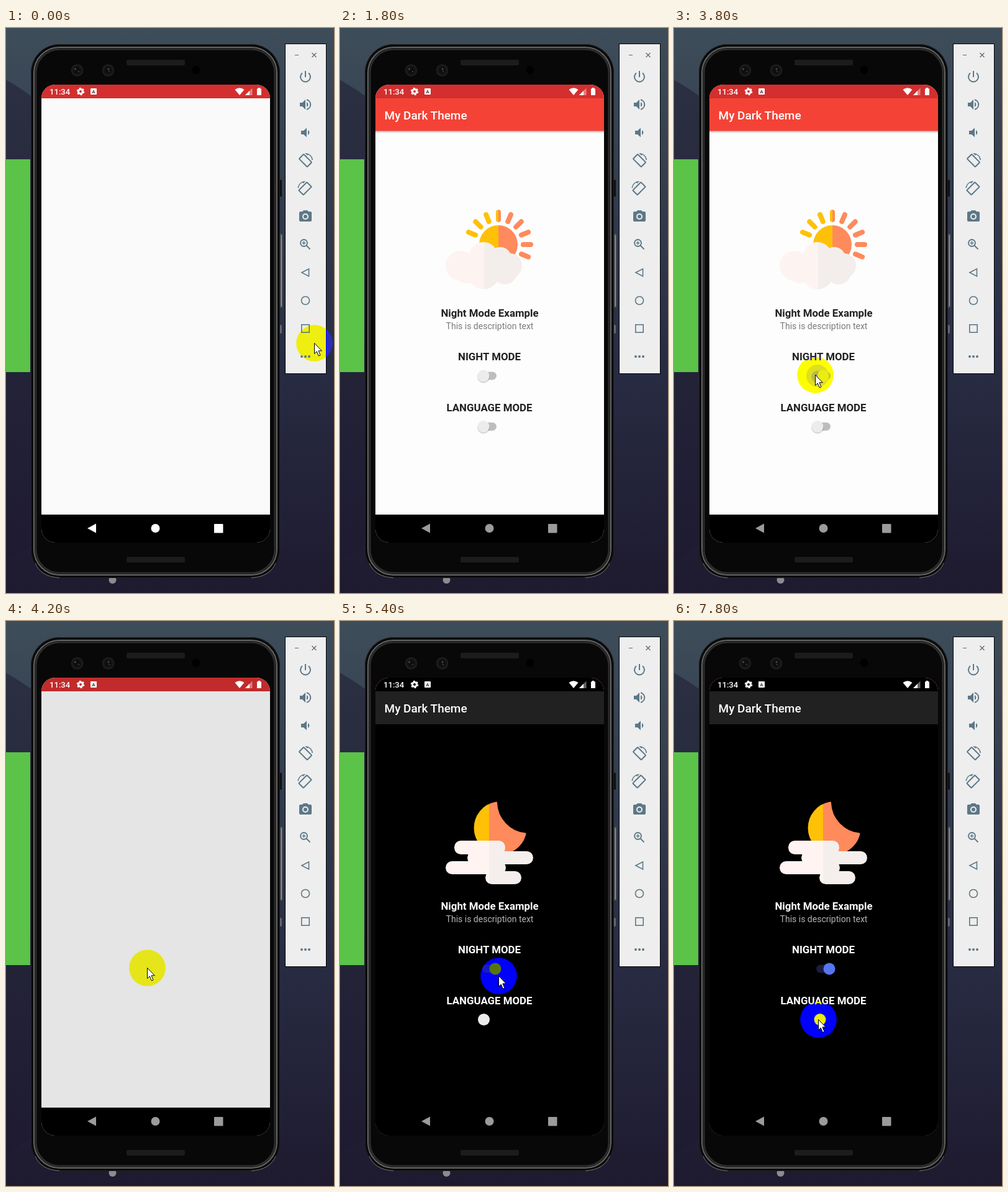
Write an HTML page that moves like this. It is 528 px wide and 908 px high and loops after 8000 ms.

```html
<!DOCTYPE html>
<html lang="en">
<head>
<meta charset="utf-8">
<title>Night mode demo</title>
<style>
  html, body { margin: 0; width: 100%; height: 100%; overflow: hidden; background: #2b3248; }
  svg { display: block; width: 528px; height: 908px; }
  text { font-family: Roboto, "Open Sans", sans-serif; }

  /* One loop is 8 s; a 200 ms step is 2.5%. */
  .app, .day, .night, .dim, .ink, .soft, .pointer, .press, .toggle, .nudge {
    animation: 8s step-end infinite;
  }
  .app { animation-name: app; }
  .day { animation-name: day; }
  .night { animation-name: night; }
  .dim { animation-name: dim; }
  .ink { animation-name: ink; }
  .soft { animation-name: soft; }
  .pointer { animation-name: pointer; }
  .press { animation-name: press; }
  .toggle { animation-name: toggle; }
  .nudge { animation-name: nudge; }
  .nav { animation: nav 8s linear infinite; }
  .halo { fill: #00f; mix-blend-mode: difference; }

  @keyframes app {
    0% { visibility: hidden; } 22.5% { visibility: visible; }
    52.5% { visibility: hidden; } 67.5%, 100% { visibility: visible; }
  }
  @keyframes day {
    0% { visibility: hidden; } 22.5% { visibility: visible; } 52.5%, 100% { visibility: hidden; }
  }
  @keyframes night { 0% { visibility: hidden; } 67.5%, 100% { visibility: visible; } }
  @keyframes dim { 0% { opacity: 0; } 52.5% { opacity: .085; } 55%, 100% { opacity: 0; } }
  @keyframes ink { 0% { fill: #212121; } 67.5%, 100% { fill: #fff; } }
  @keyframes soft { 0% { fill: #7b7b7b; } 67.5%, 100% { fill: #b4b4b4; } }
  @keyframes press { 0% { opacity: 0; } 42.5% { opacity: .12; } 50%, 100% { opacity: 0; } }
  @keyframes toggle {
    0% { transform: none; fill: #ececec; }
    47.5% { transform: translateX(9px); }
    50%, 100% { transform: translateX(19px); fill: #536dfe; }
  }
  @keyframes nudge { 0% { transform: none; } 97.5%, 100% { transform: translateX(3.5px); } }
  @keyframes nav {
    0% { fill: #fff; animation-timing-function: steps(7, end); }
    17.5%, 100% { fill: #9b9b9b; }
  }
  @keyframes pointer {
    0% { transform: translate(496px, 506px); }
    2.5% { transform: translate(506px, 506px); }
    5% { transform: translate(522px, 505px); }
    7.5% { transform: translate(570px, 505px); }
    27.5% { transform: translate(417px, 613px); }
    30% { transform: translate(390px, 606px); }
    32.5% { transform: translate(330px, 585px); }
    35% { transform: translate(268px, 566px); }
    37.5% { transform: translate(223px, 558px); }
    40% { transform: translate(227px, 557px); }
    55% { transform: translate(241px, 558px); }
    57.5% { transform: translate(252px, 570px); }
    60% { transform: translate(258px, 576px); }
    62.5% { transform: translate(255px, 570px); }
    70% { transform: translate(258px, 580px); }
    72.5% { transform: translate(266px, 596px); }
    75% { transform: translate(274px, 607px); }
    77.5% { transform: translate(278px, 612px); }
    80% { transform: translate(243px, 630px); }
    82.5% { transform: translate(241px, 598px); }
    85% { transform: translate(240px, 557px); }
    87.5% { transform: translate(240px, 562px); }
    90% { transform: translate(236px, 600px); }
    92.5% { transform: translate(232px, 630px); }
    95% { transform: translate(233px, 639px); }
    97.5%, 100% { transform: translate(232px, 640px); }
  }
</style>
</head>
<body>
<svg viewBox="0 0 528 908">
  <defs>
    <linearGradient id="sky" x2="0" y2="1">
      <stop stop-color="#3e4d5a"/><stop offset=".25" stop-color="#343f50"/>
      <stop offset=".6" stop-color="#282c43"/><stop offset="1" stop-color="#1e1a2f"/>
    </linearGradient>
    <linearGradient id="disc" x2="0" y2="1">
      <stop stop-color="#2c3143"/><stop offset="1" stop-color="#1d1930"/>
    </linearGradient>
    <linearGradient id="sun" gradientUnits="userSpaceOnUse" x1="254.5" x2="255.5">
      <stop stop-color="#fec107"/><stop offset="1" stop-color="#ff8a5c"/>
    </linearGradient>
    <linearGradient id="moon" gradientUnits="userSpaceOnUse" x1="239.5" x2="240.5">
      <stop stop-color="#fec107"/><stop offset="1" stop-color="#ff8a5c"/>
    </linearGradient>
    <linearGradient id="cloud" gradientUnits="userSpaceOnUse" x1="231.5" x2="232.5">
      <stop stop-color="#fdf3f1"/><stop offset="1" stop-color="#f3eeeb"/>
    </linearGradient>
    <linearGradient id="mist" gradientUnits="userSpaceOnUse" x1="239.5" x2="240.5">
      <stop stop-color="#fff4f2"/><stop offset="1" stop-color="#f4efec"/>
    </linearGradient>
    <linearGradient id="shade" x2="0" y2="1">
      <stop stop-opacity=".24"/><stop offset="1" stop-opacity="0"/>
    </linearGradient>
    <clipPath id="glass"><rect x="57" y="91" width="368" height="736" rx="22"/></clipPath>
  </defs>

  <!-- Desktop -->
  <rect width="528" height="908" fill="url(#sky)"/>
  <circle cx="-220" cy="470" r="445" fill="url(#disc)"/>
  <rect x="-303" y="211" width="342" height="342" fill="#5bc348"/>

  <!-- Phone body -->
  <circle cx="171.500" cy="887" r="6" fill="#8b8b90"/>
  <g fill="#101012">
    <rect x="440" y="244" width="4" height="27"/>
    <rect x="440" y="331" width="5" height="118" fill="#55565c"/>
    <rect x="443" y="333" width="1" height="114" fill="#a0a0a4"/>
    <rect x="440" y="477" width="4" height="14" rx="2" fill="#66676c"/>
  </g>
  <rect x="40" y="26" width="401" height="858" rx="46" fill="#080808"/>
  <g fill="none">
    <rect x="40.500" y="26.500" width="400" height="857" rx="45.500" stroke="#222"/>
    <rect x="45" y="31" width="391" height="848" rx="41" stroke="#666" stroke-width="2"/>
    <rect x="48" y="34" width="385" height="842" rx="38" stroke="#2c2c2c" stroke-width="3"/>
    <path d="M47 860Q56 882 86 883.500M434 860Q425 882 395 883.500" stroke="#8c8c8c" stroke-width=".8"/>
  </g>
  <g fill="#1c1c1e">
    <rect x="194" y="51" width="94" height="9" rx="2"/>
    <rect x="194" y="850" width="94" height="9" rx="2"/>
    <g fill="#161617" stroke="#212123" stroke-width="1.500">
      <circle cx="114.500" cy="68" r="9"/><circle cx="164.500" cy="68" r="9"/>
    </g>
    <g fill="#0e0e0f">
      <circle cx="114.500" cy="68" r="5.500"/><circle cx="164.500" cy="68" r="5.500"/>
    </g>
    <g fill="#4a4a4f">
      <circle cx="111.500" cy="66" r="1.500"/><circle cx="117" cy="70" r="1"/>
      <circle cx="165" cy="66" r="1.500"/><circle cx="166" cy="70" r="1"/>
    </g>
    <circle cx="306" cy="67.500" r="6.500" fill="#000"/>
  </g>

  <!-- Screen -->
  <g clip-path="url(#glass)">
    <rect x="57" y="91" width="368" height="736" fill="#fafafa"/>
    <rect x="57" y="91" width="368" height="22" fill="#d32f2f"/>
    <rect class="dim" x="57" y="91" width="368" height="691"/>

    <g class="day">
      <rect x="57" y="113" width="368" height="669" fill="#fdfdfd"/>
      <rect x="57" y="165" width="368" height="5" fill="url(#shade)"/>
      <rect x="57" y="113" width="368" height="52.500" fill="#f44336"/>
      <circle cx="255" cy="348" r="31" fill="url(#sun)"/>
      <g id="rays" fill="none" stroke="url(#sun)" stroke-width="8" stroke-linecap="round"></g>
      <g fill="url(#cloud)">
        <circle cx="194" cy="382" r="24"/><circle cx="231" cy="367" r="23"/>
        <circle cx="258" cy="370" r="18"/><circle cx="273" cy="382" r="20"/>
        <circle cx="265" cy="392" r="20"/><circle cx="231" cy="395" r="25"/>
        <circle cx="203" cy="390" r="20"/>
      </g>
      <g fill="#bdbdbd">
        <rect x="229" y="552.500" width="23" height="13" rx="6.500"/>
        <rect x="229" y="634" width="23" height="13" rx="6.500"/>
      </g>
      <circle class="press" cx="231" cy="559" r="18"/>
      <g fill="#000" opacity=".16">
        <circle cx="231" cy="560.500" r="10"/><circle cx="231" cy="642" r="10"/>
      </g>
      <g fill="#ececec">
        <circle class="toggle" cx="231" cy="559" r="9.500"/><circle cx="231" cy="640.500" r="9.500"/>
      </g>
    </g>

    <g class="night">
      <rect x="57" y="91" width="368" height="736"/>
      <rect x="57" y="113" width="368" height="53" fill="#212121"/>
      <path d="M251.500 292A52 52 0 0 0 298 342A41 41 0 1 1 251.500 292Z" fill="url(#moon)"
        stroke="url(#moon)" stroke-width="3" stroke-linejoin="round"/>
      <g fill="url(#mist)">
        <rect x="184" y="353" width="82" height="22" rx="10.500"/>
        <rect x="205" y="370" width="106" height="21" rx="10.500"/>
        <rect x="170" y="386" width="97" height="21" rx="10.500"/>
        <rect x="234" y="402" width="58" height="21" rx="10.500"/>
      </g>
      <rect x="229" y="552.500" width="23" height="13" rx="6.500" fill="#1a1d42"/>
      <circle cx="250" cy="559" r="9.500" fill="#5576f0"/>
      <circle class="nudge" cx="231.500" cy="640.500" r="9.500" fill="#ececec"/>
    </g>

    <g class="app">
      <text x="71.500" y="147" font-size="19" font-weight="500" fill="#fff">My Dark Theme</text>
      <g class="ink" font-size="16.850" font-weight="700" text-anchor="middle">
        <text x="241" y="464">Night Mode Example</text>
        <text x="240.500" y="534">NIGHT MODE</text>
        <text x="240.500" y="616">LANGUAGE MODE</text>
      </g>
      <text class="soft" x="241" y="483.500" font-size="14" text-anchor="middle">This is description text</text>
    </g>

    <!-- Status icons -->
    <g fill="#fff">
      <text x="70" y="107" font-size="13.100" font-weight="500">11:34</text>
      <circle cx="120" cy="102" r="3.500" fill="none" stroke="#fff" stroke-width="3"/>
      <circle cx="120" cy="102" r="5.300" fill="none" stroke="#fff" stroke-width="2" stroke-dasharray="2.775"/>
      <rect x="136" y="97" width="10" height="10" rx="1"/>
      <text x="141" y="105" font-size="8" font-weight="700" text-anchor="middle" fill="#444">A</text>
      <path d="M368.500 99Q376 93.500 383.500 99L376 108Z"/>
      <path d="M396.500 96.500V108H385Z" opacity=".4"/>
      <path d="M392 101V108H385Z"/>
      <path d="M404 97.500H405.800V96H409.200V97.500H411V108H404Z"/>
    </g>

    <rect x="57" y="782" width="368" height="45"/>
    <g class="nav">
      <path d="M131 804L145 796.500V811.500Z"/>
      <circle cx="240.500" cy="804" r="7"/>
      <rect x="335" y="797" width="14.500" height="14.500" rx="1"/>
    </g>
  </g>

  <!-- Tool panel -->
  <rect x="449.500" y="25.500" width="66" height="530" fill="#eee" stroke="#000"/>
  <path d="M465 43.500H471M492.500 40L499.500 47M499.500 40L492.500 47" stroke="#666" stroke-width="1.200"/>
  <g fill="none" stroke="#5c7887" stroke-width="2">
    <path d="M482 69V79M477 72.200A8 8 0 1 0 487 72.200"/>
    <path d="M473 120H477L482 115V131L477 126H473ZM484 119A4.500 4.500 0 0 1 484 127Z" fill="#5c7887" stroke="none"/>
    <path d="M484 115.200A8 8 0 0 1 484 130.800"/>
    <path d="M475 165H479L484 160.500V175.500L479 171H475ZM486 164A4.500 4.500 0 0 1 486 172Z" fill="#5c7887" stroke="none"/>
    <g id="turn">
      <rect x="-5.250" y="-9.250" width="10.500" height="18.500" rx="1" transform="translate(482 213) rotate(-45)"/>
      <path d="M481.300 201A12 12 0 0 1 494 212H492.400A10.500 10.500 0 0 0 486.500 203.500L485.100 204.800Z" fill="#5c7887" stroke="none"/>
    </g>
    <use href="#turn" transform="matrix(-1 0 0 1 963.500 45)"/>
    <path d="M474 295H477L479 293H485L487 295H490Q492 295 492 297V309Q492 311 490 311H474Q472 311 472 309V297Q472 295 474 295Z" fill="#5c7887" stroke="none"/>
    <circle cx="482" cy="303" r="4" stroke="#eee"/>
    <g stroke-width="1.800">
      <circle cx="479.500" cy="345.500" r="5.500"/>
      <path d="M483.500 349.500L489.500 355.500"/>
      <path d="M476.500 345.500H482.500M479.500 342.500V348.500" stroke-width="1.400"/>
    </g>
    <g stroke-width="1.600">
      <path d="M476 393L487.500 387V399Z"/>
      <circle cx="482" cy="438" r="6.500"/>
      <rect x="475.800" y="476.800" width="12.400" height="12.400"/>
    </g>
    <g fill="#5c7887" stroke="none">
      <circle cx="476" cy="528" r="2"/><circle cx="482" cy="528" r="2"/><circle cx="488" cy="528" r="2"/>
    </g>
  </g>

  <!-- Pointer -->
  <circle class="pointer halo" cx=".5" cy=".5" r="29.300"/>
  <path class="pointer" d="M.5 .5V17.500L4.300 13.900L7.300 21L10 19.900L7 12.800H12.300Z" fill="#fff" stroke="#000"/>
</svg>
<script>
  const ray = i => {
    const a = (i - 1) * Math.PI / 8;
    const at = r => `${255 + r * Math.cos(a)} ${348 - r * Math.sin(a)}`;
    return `M${at(40)}L${at(52)}`;
  };
  const path = document.createElementNS("http://www.w3.org/2000/svg", "path");
  path.setAttribute("d", Array.from({ length: 9 }, (_, i) => ray(i)).join(""));
  document.getElementById("rays").append(path);
</script>
</body>
</html>
```
